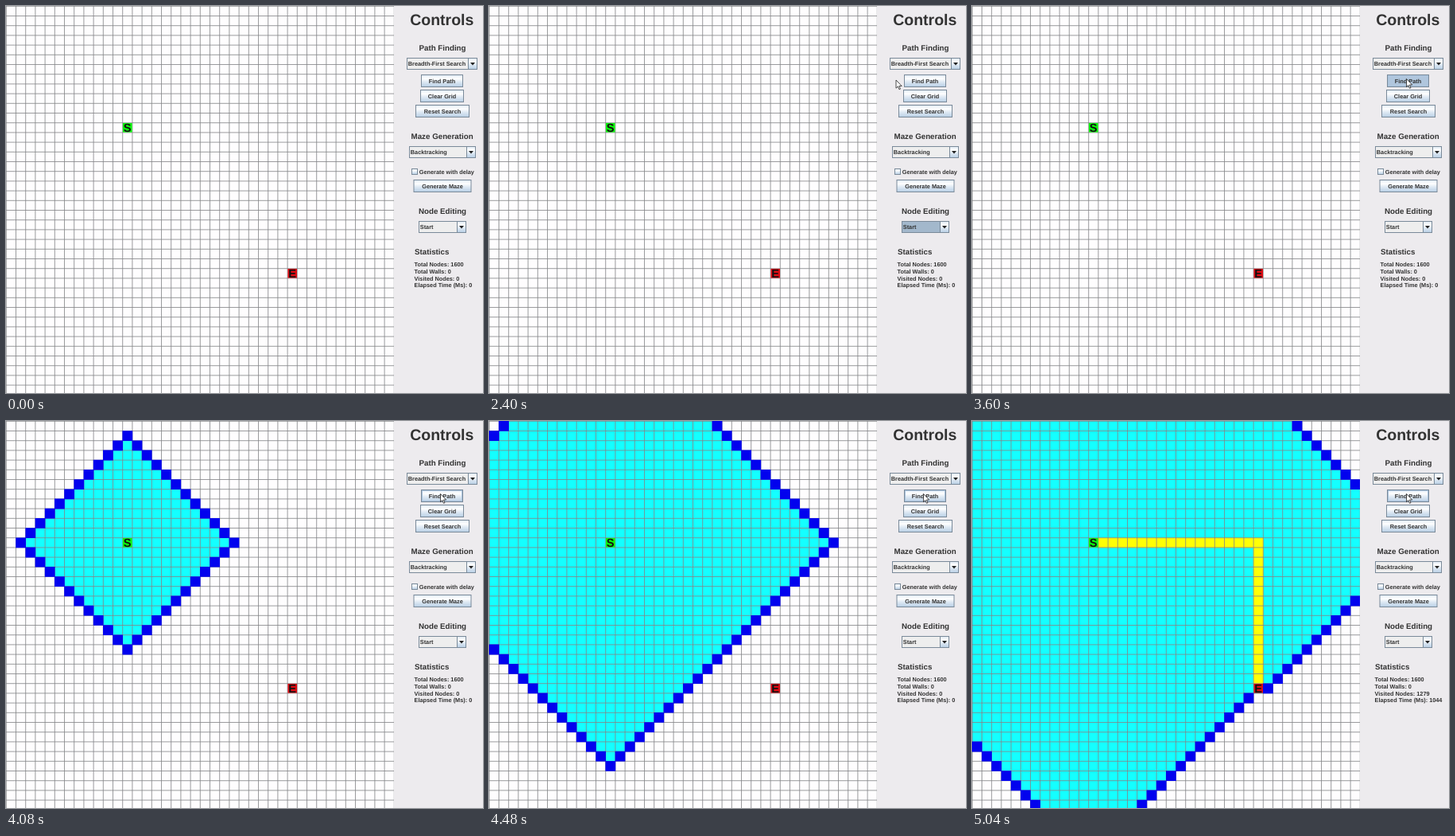
Animation, 600 px wide and 486 px high, one loop 5080 ms. Source, as an HTML page:

```html
<!DOCTYPE html>
<html lang="en">
<head>
<meta charset="utf-8">
<title>Path finding</title>
<style>
html, body { margin: 0; width: 100%; height: 100%; overflow: hidden; background: #edebee; }
svg { display: block; width: 600px; height: 486px; }
text { font: bold 7.32px Arial, "Liberation Sans", sans-serif; fill: #333; text-rendering: geometricPrecision; white-space: pre; }
.title { font-size: 19.52px; }
.head { font-size: 9.76px; }
.mark { font-size: 14.64px; fill: #111; }
.mid { text-anchor: middle; }
</style>
</head>
<body>
<svg id="stage" viewBox="0 0 600 486" xmlns="http://www.w3.org/2000/svg">
  <defs>
    <linearGradient id="ocean" x2="0" y2="1">
      <stop offset="0" stop-color="#dde8f3"/>
      <stop offset=".3" stop-color="#fff"/>
      <stop offset=".6" stop-color="#dde8f3"/>
      <stop offset="1" stop-color="#b8cfe5"/>
    </linearGradient>
  </defs>
</svg>
<script>
const LOOP = 5080, FRAME = 40;
const N = 40, CELL = 12.2, LINE = .61;
const START = [12, 12], END = [29, 27];
const SEARCH = 3760, ORIGIN = 3715, LEVEL_MS = 32.6, LAST = 33;
const FOCUS = 2080, PRESS = 3520, RELEASE = 3720;
const EDGE = '#7a8a99';

const stage = document.getElementById('stage');

function add(tag, attrs, text) {
  const el = document.createElementNS(stage.namespaceURI, tag);
  for (const k in attrs) el.setAttribute(k, attrs[k]);
  if (text !== undefined) el.textContent = text;
  return stage.appendChild(el);
}
const rect = (x, y, width, height, fill, stroke = 'none') =>
  add('rect', { x, y, width, height, fill, stroke });
const label = (x, y, text, cls = '') => add('text', { x, y, class: cls }, text);

// A cell includes the grid lines on all of its sides
const SIDE = CELL + LINE;
const square = (x, y) =>
  `M${(x * CELL).toFixed(2)} ${(y * CELL).toFixed(2)}h${SIDE}v${SIDE}h${-SIDE}z`;

// Grid
rect(0, 0, 488, 486, '#fefdfe');
const visited = add('path', { fill: '#14ffff' });
const route = add('path', { fill: '#ffff06' });
let lines = '';
for (let i = 0; i <= N; i++) {
  const p = (i * CELL + LINE / 2).toFixed(2);
  lines += `M${p} 0V486M0 ${p}H488`;
}
add('path', { d: lines, stroke: '#848688', 'stroke-opacity': .82 });
const frontier = add('path', { fill: '#0202ee' });

function marker([x, y], letter, fill) {
  const inner = CELL - LINE;
  rect(x * CELL + LINE, y * CELL + LINE, inner, inner, fill);
  label((x + .5) * CELL + .2, (y + .5) * CELL + 5.6, letter, 'mark mid');
}
marker(START, 'S', '#0df50d');
marker(END, 'E', '#dd0c14');

// Controls
rect(488, 0, 112, 486, '#edebee');

function button(x, y, w, h, text) {
  const box = rect(x + .5, y + .5, w - 1, h - 1, 'url(#ocean)', EDGE);
  const glow = rect(x + 1.5, y + 1.5, w - 3, h - 3, 'none', '#a9c2dc');
  glow.setAttribute('visibility', 'hidden');
  label(x + w / 2, y + h / 2 + 2.7, text, 'mid');
  return { box, glow };
}

function combo(x, y, w, text) {
  const h = 15, bx = x + w - 12;
  const field = rect(x + .5, y + .5, w - 1, h - 1, '#eee', EDGE);
  rect(bx + .5, y + .5, 11, h - 1, 'url(#ocean)', EDGE);
  add('path', { d: `M${bx + 3} ${y + 6}h6l-3 3.4z`, fill: '#222' });
  label(x + 1.8, y + 10, text);
  return field;
}

label(548.3, 24, 'Controls', 'title mid');
label(549, 56.3, 'Path Finding', 'head mid');
combo(504, 65, 89, 'Breadth-First Search');
const find = button(522, 86, 53, 16, 'Find Path');
button(521, 105, 55, 16, 'Clear Grid');
button(515, 124, 68, 16, 'Reset Search');
label(548.6, 167.2, 'Maze Generation', 'head mid');
combo(507, 176, 84, 'Backtracking');
rect(510.5, 204.5, 7, 7, 'url(#ocean)', EDGE);
label(519.8, 210.6, 'Generate with delay');
button(512.5, 218, 73, 16, 'Generate Maze');
label(549, 261.2, 'Node Editing', 'head mid');
const node = combo(519, 270, 60, 'Start');

const stats = [label(514, 312.4, 'Statistics', 'head')];
for (let i = 0; i < 4; i++) stats.push(label(513.6, 327.3 + i * 8.6, ''));

const cursor = add('path', {
  d: 'M0 0V10.2L2.3 8L4 11.8L5.5 11.1L3.9 7.5H7.2Z',
  fill: '#fff', stroke: '#222', 'stroke-width': .8
});

// Time, x, y of the pointer's stops
const stops = [[2080, 532, 262], [2360, 512, 93], [2520, 512, 93], [2880, 546.5, 91.5]];

function pointer(t) {
  const i = stops.findIndex(s => s[0] > t);
  if (i < 0) return stops[stops.length - 1].slice(1);
  const [t0, x0, y0] = stops[i - 1], [t1, x1, y1] = stops[i];
  const u = (t - t0) / (t1 - t0), e = u * u * (3 - 2 * u);
  return [x0 + (x1 - x0) * e, y0 + (y1 - y0) * e];
}

function drawSearch(level) {
  const done = level === LAST;
  let seen = '', front = '', path = '';
  if (level > 0) {
    for (let y = 0; y < N; y++) for (let x = 0; x < N; x++) {
      const d = Math.abs(x - START[0]) + Math.abs(y - START[1]);
      // The search stops before this corner is expanded
      const limit = level - (done && x > START[0] && y > END[1]);
      if (d < limit) seen += square(x, y);
      else if (d === limit) front += square(x, y);
    }
  }
  if (done) {
    for (let x = START[0] + 1; x <= END[0]; x++) path += square(x, START[1]);
    for (let y = START[1] + 1; y < END[1]; y++) path += square(END[0], y);
  }
  visited.setAttribute('d', seen);
  frontier.setAttribute('d', front);
  route.setAttribute('d', path);

  const rows = ['Statistics', 'Total Nodes: 1600', 'Total Walls: 0',
    'Visited Nodes: ' + (done ? 1279 : 0), 'Elapsed Time (Ms): ' + (done ? 1044 : 0)];
  rows.forEach((row, i) => {
    stats[i].textContent = row;
    stats[i].setAttribute('x', (done ? 507 : 514) - (i ? .4 : 0));
  });
}

let shown = -1;
function render(time) {
  const t = Math.floor(time % LOOP / FRAME) * FRAME;
  const level = t < SEARCH ? 0 : Math.min(LAST, Math.floor((t - ORIGIN) / LEVEL_MS));
  if (level !== shown) drawSearch(shown = level);

  const visible = t >= FOCUS;
  const [x, y] = visible ? pointer(t) : [0, 0];
  cursor.setAttribute('visibility', visible ? 'visible' : 'hidden');
  cursor.setAttribute('transform', `translate(${x} ${y})`);

  const pressed = t >= PRESS && t < RELEASE;
  const hover = visible && x > 522 && y > 86 && y < 102;
  find.box.setAttribute('fill', pressed ? '#b0c6dd' : 'url(#ocean)');
  find.glow.setAttribute('visibility', hover ? 'visible' : 'hidden');
  node.setAttribute('fill', t >= FOCUS && t < PRESS ? '#a3b8cc' : '#eee');
}

function tick() {
  render(performance.now());
  requestAnimationFrame(tick);
}
tick();
</script>
</body>
</html>
```
